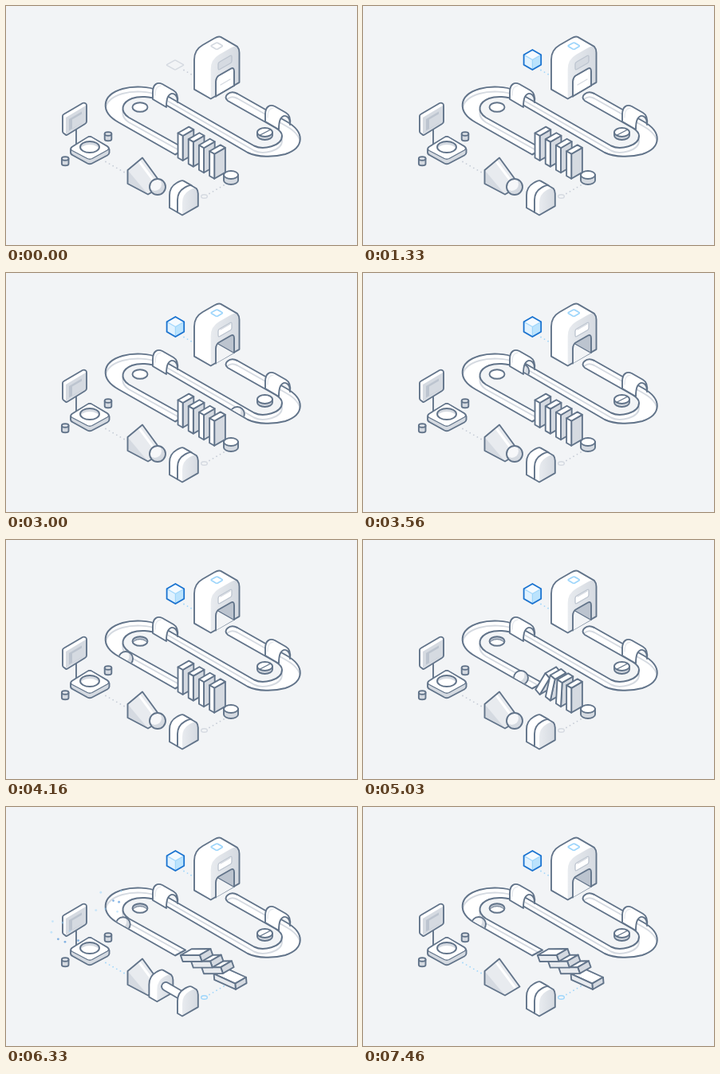
Animation, 440 px wide and 300 px high, one loop 8.5 s. Source, as an HTML page with a canvas:

```html
<!DOCTYPE html>
<html>
<head>
<meta charset="utf-8">
<style>
html, body { margin: 0; width: 100%; height: 100%; overflow: hidden; background: #f2f4f6; }
canvas { display: block; width: 440px; height: 300px; }
</style>
</head>
<body>
<canvas width="440" height="300"></canvas>
<script>
const LOOP = 8500;
const BG = '#f2f4f6', LINE = '#62748a', WHITE = '#fff', PALE = '#e8ebef', GREY = '#d5dae1', DARK = '#bcc4cf';
const BLUE = '#1a73d0', SKY = '#9fd6fb';
const g = document.querySelector('canvas').getContext('2d');

const clamp = v => Math.max(0, Math.min(1, v));
const span = (t, a, b) => clamp((t - a) / (b - a));
const ease = s => s * s * (3 - 2 * s);

function draw(path, fill, stroke = LINE, width = 1.9) {
  const p = path instanceof Path2D ? path : new Path2D(path);
  if (fill) { g.fillStyle = fill; g.fill(p); }
  if (stroke) { g.strokeStyle = stroke; g.lineWidth = width; g.stroke(p); }
}
function at(x, y, fn) {
  g.save();
  g.translate(x, y);
  fn();
  g.restore();
}
function within(path, fn) {
  g.save();
  g.clip(path);
  fn();
  g.restore();
}
function blend(x0, y0, x1, y1, a, b) {
  const fill = g.createLinearGradient(x0, y0, x1, y1);
  fill.addColorStop(0, a);
  fill.addColorStop(1, b);
  return fill;
}
function oval(x, y, rx, ry) {
  const p = new Path2D();
  p.ellipse(x, y, rx, ry, 0, 0, 7);
  return p;
}
const poly = pts => 'M' + pts.join('L') + 'Z';

function ball(x, y, r) {
  const c = oval(x, y, r, r);
  draw(c, GREY, null);
  within(c, () => draw(oval(x - r * .35, y - r * .35, r * .85, r * .85), '#f6f7f9', null));
  draw(c);
}
function drum(x, y, rx, ry, h, top = WHITE) {
  draw(`M${x - rx},${y}v${h}a${rx},${ry} 0 0 0 ${2 * rx},0v${-h}z`, GREY);
  draw(oval(x, y, rx, ry), top);
}
function dots(x, y, n, dx, dy, on) {
  for (let i = 0; i < n; i++) draw(oval(x + i * dx, y + i * dy, .9, .9), on ? SKY : '#c6ccd6', null);
}

// Block with a rounded front; (x, y) is the front lower left corner
function arch(x, y, w, h, a, d) {
  const k = .577, r = 1.155 * a, top = -h - w * k;
  const mx = w - a / 4, my = top + .433 * a;
  const head = `L0,${r - h}Q0,${-h} ${a},${-h - a * k}L${w - a},${-h - (w - a) * k}`;
  const tail = `L${w},${-w * k}Z`;
  const face = `M0,0${head}Q${w},${top} ${w},${top + r}${tail}`;
  const shift = (px, py) => `${px - d},${py - d * k}`;
  const body = `M0,0L${shift(0, 0)}L${shift(0, r - h)}Q${shift(0, -h)} ${shift(a, -h - a * k)}` +
    `L${shift(w - a, -h - (w - a) * k)}Q${shift(w - a / 2, top + a * .289)} ${shift(mx, my)}` +
    `L${mx},${my}Q${w},${top + .72 * a} ${w},${top + r}${tail}`;
  at(x, y, () => {
    draw(body, WHITE, null);
    draw(face, blend(0, 0, w, 0, PALE, GREY), null);
    draw(body);
  });
}

const track = new Path2D('M212,186.500L141,146C118,133 119,112 146,104C160,100 180,101 190,106L311,175.500' +
  'C322,181 346,176 346,163C346,159 343,156 338,153L278,119C271,114 280,105 290,110L350,144' +
  'C376,158 374,178 350,186C335,190 316,190 303,184L190,118C182,113 166,113 158,116' +
  'C145,121 142,132 154,140L225,179.500Z');
const doorway = new Path2D('M263,113.500V95Q263,89 268,86.500L282,78.500Q286,76.500 286,82V100');
const pane = new Path2D('M266,73Q266,71 268,70L281,62.500Q283,61.500 283,63.500V69Q283,71 281,72L268,79.500Q266,80.500 266,78Z');
const ballArea = new Path2D();
for (const y of [-1, -8]) ballArea.addPath(track, new DOMMatrix([1, 0, 0, 1, 0, y]));
ballArea.addPath(doorway);
ballArea.addPath(new Path2D('M263,114L286,101L300,118L280,122Z'));

// Rolling ball: time, x, y
const route = [
  [1750, 280, 101], [1900, 290, 119], [2250, 338, 149], [2430, 356, 161], [2620, 353, 174], [2800, 328, 186],
  [3000, 290, 177], [3480, 215, 133], [3640, 190, 118], [3770, 165, 109], [3900, 140, 116], [4000, 134, 130],
  [4080, 140, 141], [4160, 150, 149], [4360, 172, 161], [4840, 206, 177], [5030, 198, 173], [5800, 159, 155],
  [6200, 148, 148], [6900, 144, 146], [7460, 145, 147]
];
function routeAt(t) {
  const last = route.length - 1;
  if (t >= route[last][0]) return route[last].slice(1);
  const i = route.findIndex(p => p[0] > t) - 1;
  const [a, b, c, d] = [-1, 0, 1, 2].map(n => route[Math.max(0, Math.min(last, i + n))]);
  const s = (t - b[0]) / (c[0] - b[0]);
  if (b[0] === 4840 || c[0] === 4840) return [1, 2].map(k => b[k] + (c[k] - b[k]) * s);
  return [1, 2].map(k => b[k] + .5 * s * (c[k] - a[k] +
    s * (2 * a[k] - 5 * b[k] + 4 * c[k] - d[k] + s * (3 * (b[k] - c[k]) + d[k] - a[k]))));
}

function drawTrack(t) {
  draw(track, WHITE, null);
  within(track, () => at(0, 6, () => draw(track, null, GREY, 2)));
  draw(track, null, LINE, 2);
  const hole = oval(168, 127, 9.500, 5.800), sunk = 3.500 * ease(span(t, 3780, 3950));
  draw(hole, sunk ? DARK : WHITE, null);
  within(hole, () => draw(oval(168, 127 + sunk, 9.500, 5.800), WHITE, sunk ? LINE : null, 1));
  draw(hole);
  drum(324.500, 158.500, 9.500, 5.500, 4);
  if (t < 2680 || t > 3400) draw('M318.500,162L331,155.500', null, LINE, 1.4);
}

function drawTunnel() {
  draw('M184,117V108C184,98 190,95 196,98L210,106C215,109 216,114 215,121C215,109 207,107 203,114C201,118 201,122 201,127Z', WHITE);
  draw('M187,112C187,104 189,101 194,100', null, PALE, 1.5);
}

function drawHouse(t) {
  arch(256.700, 116.500, 35.800, 49.500, 10.500, 20.700);
  const lift = 28 * ease(span(t, 1370, 1710));
  draw(doorway, BG, null);
  within(doorway, () => draw('M265,88.500L286,100.500L292,70L262,80Z', DARK, LINE, 1.4));
  draw(pane, GREY, null);
  const door = () => at(0, -lift, () => {
    draw(doorway, WHITE);
    draw('M263,113.500L286,100');
    draw('M269,99L281,92', null, GREY, 1.4);
  });
  within(doorway, door);
  if (lift) within(pane, door);
  draw(doorway);
  if (!lift) draw('M263,113.500L286,100');
  draw(pane, null, DARK, 1.3);
  draw('M258,51Q256.500,50 258,49.200L263,46.500Q264.500,45.800 266,46.600L270.500,49.200Q272,50 270.500,51L265.500,54Q264.500,54.600 263,54Z', WHITE, t > 1200 ? SKY : GREY, 1.8);
}

function drawCube(t) {
  draw('M202,73.300L211,68.300Q212,67.800 213,68.300L222,73.300Q223,74 222,74.700L213,79.700Q212,80.200 211,79.700L202,74.700Q201,74 202,73.300Z', null, GREY, 1.5);
  dots(223, 80.500, 4, 4.500, 2.600, t > 1150);
  if (t < 30) return;
  at(212.400, 67.500 - 80 * (1 - span(t, 30, 1200)) ** 2, () => {
    draw('M0,-12.500L10.800,-6.300L0,0L-10.800,-6.300Z', '#f4faff', null);
    draw('M-10.800,-6.300L0,0V12.500L-10.800,6.300Z', '#e0f2ff', null);
    draw('M10.800,-6.300L0,0V12.500L10.800,6.300Z', '#bbe3fd', null);
    draw('M-10.800,-6.300L0,0L10.800,-6.300M0,0V12.500', null, SKY, 1.2);
    draw('M0,-12.500L10.800,-6.300V6.300L0,12.500L-10.800,6.300V-6.300Z', null, BLUE, 1.8);
  });
}

function domino(x, y, turn) {
  const c = Math.cos(turn), s = Math.sin(turn), T = 7, W = 15.8, H = 31;
  const pt = (u, v, z) => {
    const ru = u * c + z * s, rz = z * c - u * s;
    return [x + .866 * (ru + v), y + .5 * (ru - v) - rz];
  };
  const flat = turn > Math.PI / 4, u = flat ? -T : 0;
  draw(poly([pt(u, 0, 0), pt(u, W, 0), pt(u, W, H), pt(u, 0, H)]), flat ? WHITE : GREY);
  draw(poly([pt(0, 0, H), pt(-T, 0, H), pt(-T, W, H), pt(0, W, H)]), flat ? GREY : WHITE);
  draw(poly([pt(0, 0, 0), pt(-T, 0, 0), pt(-T, 0, H), pt(0, 0, H)]), flat ? PALE : WHITE);
}
function drawDominoes(t) {
  const on = t > 5230;
  dots(273, 225, 5, -4.500, 2.600, on);
  draw(oval(248.500, 239, 3.800, 2.300), null, on ? SKY : GREY, 1.5);
  const press = 4 * span(t, 5190, 5240);
  drum(282, 212 + press, 9, 5, 7 - press);
  const order = t > 5060 ? [3, 2, 1, 0] : [0, 1, 2, 3];
  for (const i of order) {
    const start = 4860 + 55 * i, full = i < 3 ? 63 : 84;
    domino(221.600 + 13.200 * i, 194 + 7.600 * i, full * Math.PI / 180 * span(t, start, start + 260) ** 2);
  }
}

function drawHoop() {
  draw('M88,150V174');
  draw('M71,138Q71,136.500 73,135.500L96,122Q98,121 100,122.500Q101,123 101,125V145Q101,147 99,148L77,161.500Q75.500,162.500 74,161L72,159.500Q71,159 71,157Z', WHITE, null);
  draw('M75,140L100,125V146.500L75,161Z', GREY, null);
  draw('M79,142L95,132.500V147L79,156.500Z', DARK, null);
  draw('M83,142.500L95,135.500V147L83,154Z', GREY, null);
  draw('M71,138Q71,136.500 73,135.500L96,122Q98,121 100,122.500Q101,123 101,125V145Q101,147 99,148L77,161.500Q75.500,162.500 74,161L72,159.500Q71,159 71,157Z');
  draw('M81,180Q81,177.500 84,176L102,165Q105,163 108,165L127,176Q129.500,177.500 129.500,180V184Q129.500,186 127,187.500L108,197.500Q105,199 102,197.500L84,187.500Q81,186 81,184Z', GREY);
  draw('M83,181.500Q80,179.500 83,177L102,165Q105,163 108,165L127,176.500Q130,179 127,181L108,191.500Q105,193 102,191.500Z', WHITE, LINE, 1.3);
  const ring = oval(105, 177, 12, 7);
  draw(ring, GREY, null);
  within(ring, () => draw(oval(105, 181, 12, 7), WHITE, null));
  draw(ring);
  drum(74.200, 191.500, 4.300, 2.300, 6.500, PALE);
  drum(128, 160.500, 4.300, 2.300, 6.500, PALE);
}

function drawSparks(t) {
  const s = (t - 5900) / 900;
  if (s <= 0 || s >= 1) return;
  g.globalAlpha = 1 - s;
  for (let i = 0; i < 14; i++) {
    const right = i % 2, out = 1 - (1 - s) ** 3;
    const dx = Math.sin(i * 2.4) * 20 * out, dy = -(30 + i * 7 % 40) * out + 22 * s * s;
    draw(oval((right ? 128 : 74) + dx, (right ? 158 : 190) + dy, 1.4, 1.4), i % 3 ? SKY : BLUE, null);
  }
  g.globalAlpha = 1;
}

function drawThrow(t) {
  dots(125, 195.500, 6, 4.600, 2.600, t > 5500);
  const wedge = 'M152.500,206L171,190.500L196.500,225.500L178,236.500L152.500,223Z';
  draw(wedge, PALE, null);
  draw('M152.500,206L178,236.500L152.500,223Z', GREY, null);
  draw('M167,195L190,226', null, WHITE, 3);
  draw(wedge);
  const push = ease(span(t, 5250, 5420)) - ease(span(t, 6080, 6900));
  const dx = -33 * push, dy = -19 * push;
  arch(215 + dx, 259 + dy, 20, 26, 9, 10);
  if (push > .05) {
    const rod = `M${226 + dx},${240 + dy}L224,239`;
    draw(rod, null, LINE, 12.4);
    draw(rod, null, WHITE, 8.800);
  }
  arch(221, 262.500, 19.800, 26, 9, 6);
}
function drawThrown(t) {
  if (t > 5900) return;
  let x, y;
  if (t < 5380) {
    const s = ease(span(t, 5250, 5380));
    x = 190 - 25 * s;
    y = 227 - 32 * s;
  } else if (t < 5800) {
    const s = (t - 5380) / 420;
    x = 165 - 64 * s;
    y = 67 + 431 * (s - .545) ** 2;
  } else {
    const s = span(t, 5800, 5900);
    x = 101 + 4 * s;
    y = 156 + 38 * s;
  }
  if (t < 5800) return ball(x, y, 10);
  const area = new Path2D('M80,130H130V177H80Z');
  area.addPath(oval(105, 177, 12, 7));
  within(area, () => ball(x, y, 10));
}

function render(t) {
  g.fillStyle = BG;
  g.fillRect(0, 0, 440, 300);
  g.lineJoin = 'round';
  g.lineCap = 'round';
  drawCube(t);
  drawTrack(t);
  drawHouse(t);
  if (t > 1750) within(ballArea, () => ball(...routeAt(t), 9 * span(t, 1740, 1800)));
  drawTunnel();
  at(141, 28, drawTunnel);
  drawDominoes(t);
  drawHoop();
  drawThrow(t);
  drawThrown(t);
  drawSparks(t);
}

const begin = performance.now();
function tick() {
  render((performance.now() - begin) % LOOP);
  requestAnimationFrame(tick);
}
tick();
</script>
</body>
</html>
```
